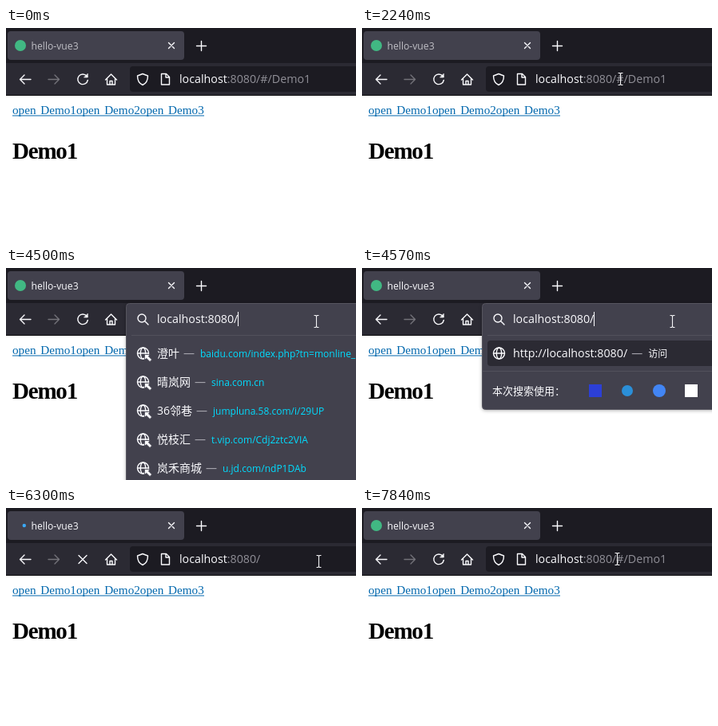
Recreate the animation shown at these times as an HTML page. Size 438 by 266 pixels, loop 8000 ms.

```html
<!DOCTYPE html>
<html lang="zh-CN">
<head>
<meta charset="utf-8">
<title>Browser address bar</title>
<style>
html, body { margin: 0; width: 100%; height: 100%; overflow: hidden; background: #fff; }
svg { display: block; width: 100vw; height: 100vh; }
text { font-family: "Open Sans", "Noto Sans CJK SC", "Noto Sans CJK", sans-serif; fill: #fbfbfe; white-space: pre; }
.line { fill: none; stroke: #fbfbfe; stroke-width: 1.4; stroke-linecap: round; stroke-linejoin: round; }
.url { font-size: 14.25px; }
.row { font-size: 14px; }
.row .dash { fill: #a9a8b0; }
.row .link { fill: #00ddff; font-size: 12px; }
.page text { font-family: "Liberation Serif", serif; }
.page .nav { font-size: 15.2px; word-spacing: 1.9px; fill: #0067ad; }
.page .head { font-size: 29px; font-weight: bold; letter-spacing: -1.2px; fill: #000; }
#panel { filter: drop-shadow(0 1px 2px rgba(0, 0, 0, .3)); }
</style>
</head>
<body>
<svg viewBox="0 0 438 266" preserveAspectRatio="none">
  <defs>
    <clipPath id="tabClip"><rect x="2" y="4" width="221" height="36" rx="4"/></clipPath>
    <g id="globe" class="line">
      <circle r="7"/><ellipse rx="3.2" ry="7"/><path d="M-7 0H7"/>
    </g>
  </defs>

  <rect width="438" height="44" fill="#1c1b22"/>
  <rect y="44" width="438" height="41" fill="#2b2a33"/>
  <rect y="84" width="438" height="1" fill="#0c0c0d"/>

  <g clip-path="url(#tabClip)">
    <rect x="2" y="4" width="221" height="36" fill="#42414d"/>
    <circle id="burst" cx="18" cy="22" fill="#0a84ff"/>
  </g>
  <circle id="favicon" cx="18" cy="22" r="7" fill="#41b883"/>
  <circle id="dot" cy="22" r="2.2"/>
  <text id="title" x="31.5" y="26.5" font-size="12.2"></text>
  <path class="line" stroke-width="1.2" d="M203.500 18.500l7 7m0-7l-7 7"/>
  <path class="line" d="M238.500 22.500h12m-6-6v12"/>

  <path class="line" d="M31 64.500H17.500m5.500-5.500l-5.500 5.500l5.500 5.500"/>
  <path class="line" opacity=".35" d="M53 64.500h13.500m-5.500-5.500l5.500 5.500l-5.500 5.500"/>
  <g id="reload" class="line">
    <path id="arc" pathLength="100" d="M101 60.300A6.300 6.300 0 1 0 102.300 65.500"/>
    <path id="tip" d="M102.300 57.500V62H97.800Z" fill="#fbfbfe" stroke-width=".6"/>
  </g>
  <path id="stop" class="line" d="M91 59.500l10 10m0-10l-10 10"/>
  <path class="line" d="M124.500 65l7-7l7 7M126.500 63.500v7.500h10v-7.500M130 71v-4.500h3V71"/>

  <g class="page">
    <text class="nav" x="8" y="108">open Demo1open Demo2open Demo3</text>
    <rect x="8" y="109.500" width="240" height="1" fill="#0067ad"/>
    <text class="head" x="8" y="163.500">Demo1</text>
  </g>

  <rect id="field" x="155" y="48" width="300" height="32" rx="4"/>
  <g id="panel">
    <rect id="sheet" x="150.500" y="44.500" width="300" rx="4" fill="#42414d" stroke="#56555f"/>
    <rect x="157" y="84" width="290" height="1" fill="#52515c"/>
    <g id="sites"></g>
    <g id="visit">
      <rect x="157" y="91" width="300" height="32" rx="4" fill="#2b2a33"/>
      <use href="#globe" x="171.500" y="107"/>
      <text class="row" x="189" y="112"><tspan class="url">http://localhost:8080/</tspan><tspan class="dash" dx="5">—</tspan><tspan dx="7" font-size="12">访问</tspan></text>
      <rect x="151" y="129" width="300" height="1" fill="#52515c"/>
      <text x="163" y="159" font-size="13">本次搜索使用：</text>
      <rect x="284" y="146" width="16" height="16" fill="#2c3fd6"/>
      <circle cx="332" cy="154" r="7" fill="#2b8fd8"/>
      <circle cx="372" cy="154" r="8" fill="#4285f4"/>
      <rect x="404" y="146" width="16" height="16" fill="#fff"/>
    </g>
  </g>

  <g id="pageIcons" class="line">
    <path d="M171 57.500l6.500 2.500c0 6-2 9.500-6.500 11.500c-4.500-2-6.500-5.500-6.500-11.500Z"/>
    <path d="M194.500 57.500h6l4 4v9.500h-10ZM200 58v4h4"/>
  </g>
  <path id="lens" class="line" d="M174 67l4 4M165 63a5 5 0 1 0 10 0a5 5 0 1 0 -10 0"/>
  <rect id="mark" x="318" y="55" height="18" fill="#2c7486"/>
  <text id="url" class="url" y="69"><tspan id="host"></tspan><tspan id="rest" fill="#919098"></tspan></text>
  <rect id="caret" y="55" width="1" height="18" fill="#fbfbfe"/>

  <path id="arrow" d="M0 0V16L3.700 12.600L6.200 18.300L8.700 17.200L6.200 11.700H11.300Z" fill="#fff" stroke="#000" stroke-width=".9"/>
  <path id="beam" d="M-3 -7.500H-1L0 -6.500L1 -7.500H3M0 -6.500V6.500M-3 7.500H-1L0 6.500L1 7.500H3" fill="none" stroke="#f4f4f6" stroke-width="1.100"/>
</svg>

<script>
const LOOP = 8000, STEP = 200 / 3;
const $ = id => document.getElementById(id);
const show = (id, on) => { $(id).style.display = on ? '' : 'none'; };
const set = (id, attrs) => { for (const k in attrs) $(id).setAttribute(k, attrs[k]); };
const clamp = v => Math.min(1, Math.max(0, v));

const sites = [
  ['澄叶', 'baidu.com/index.php?tn=monline_'],
  ['晴岚网', 'sina.com.cn'],
  ['36邻巷', 'jumpluna.58.com/i/29UP'],
  ['悦枝汇', 't.vip.com/Cdj2ztc2VIA'],
  ['岚禾商城', 'u.jd.com/ndP1DAb']
];
$('sites').innerHTML = sites.map(([name, link], i) => {
  const y = 107 + 36 * i;
  return `<use href="#globe" x="171.500" y="${y}"/>
    <path transform="translate(173.500 ${y + 1.5})" d="M0 0H7L4.800 2.200L9 6.500L6.500 9L2.200 4.800L0 7Z" fill="#fbfbfe" stroke="#42414d" stroke-width=".8"/>
    <text class="row" x="189" y="${y + 5}">${name}<tspan class="dash" dx="5">—</tspan><tspan class="link" dx="7">${link}</tspan></text>`;
}).join('');

// time, x, y of the pointer
const path = [
  [500, 360, 255], [567, 295, 222], [633, 240, 202], [700, 213, 195], [833, 213, 195],
  [1167, 69, 170], [1433, 190, 130], [1700, 327, 78], [1833, 326, 70], [2233, 323, 64],
  [2433, 319, 64], [2567, 345, 65], [2967, 388, 67], [4767, 388, 67], [4833, 389, 67],
  [5167, 389, 67], [5233, 391, 67], [7100, 391, 67], [7300, 376, 66], [7633, 328, 64], [7833, 319, 64]
];
// time, bright part, dim part
const address = [
  [0, 'localhost', ':8080/#/Demo1'], [2290, 'localhost:8080/#/Demo1', ''],
  [4490, 'localhost:8080/', ''], [5560, 'localhost:8080', ''],
  [6160, 'localhost', ':8080/'], [6360, 'localhost', ':8080/#/Demo1']
];
const titles = [[0, 'hello-vue3'], [5625, 'localhost:8080/'], [6160, 'hello-vue3']];
const edges = [318, 327.2, 332.4, 342.8, 350.8, 364, 372.7, 381];

const current = (table, t) => table.filter(r => r[0] <= Math.max(t, 0)).pop();

function pointer(t) {
  const i = path.findIndex(p => p[0] > t);
  if (i < 0) return path[path.length - 1].slice(1);
  if (i === 0) return path[0].slice(1);
  const [t0, x0, y0] = path[i - 1], [t1, x1, y1] = path[i];
  const k = (t - t0) / (t1 - t0);
  return [x0 + (x1 - x0) * k, y0 + (y1 - y0) * k];
}

function draw(now) {
  // the screen refreshes 15 times a second
  const t = (Math.floor((now + 7) / STEP + .5) - .5) * STEP;
  const within = (a, b) => t > a - 10 && t < b - 10;

  // tab
  const loading = within(5633, 6633);
  $('title').textContent = current(titles, t)[1];
  set('title', { opacity: t < 2290 ? .68 : 1 });
  show('favicon', !loading);
  show('dot', loading);
  set('dot', {
    cx: 18 - 6 * Math.cos((t - 5667) / 1050 * 2 * Math.PI),
    fill: t < 6160 ? '#a5a4ac' : '#3aa8f5'
  });
  const p = clamp((t - 6640) / 375), grow = 1 - (1 - p) ** 1.65;
  show('burst', p > 0 && p < 1);
  set('burst', { r: 8 * (1 + 39 * grow), opacity: .4 * (1 - grow) });

  // reload and stop
  const busy = within(5767, 6633), turn = clamp((t - 6600) / 300);
  const back = within(6633, 7233);
  show('stop', busy);
  show('reload', !busy);
  set('reload', { opacity: back ? .4 : 1 });
  set('arc', { 'stroke-dasharray': back && turn < 1 ? `0 ${100 - 100 * turn - 12} 100` : 'none' });
  show('tip', !back || turn === 1);

  // address bar
  const focus = within(2300, 6167), open = within(2367, 5567);
  const fresh = t > 4557, typed = within(4500, 5567);
  set('field', { fill: focus ? '#42414d' : '#1c1b22' });
  show('panel', open);
  show('sites', !fresh);
  show('visit', fresh);
  set('sheet', { height: fresh ? 133 : 240 });
  show('pageIcons', !typed);
  show('lens', typed);
  const [, host, rest] = current(address, t);
  $('host').textContent = host;
  $('rest').textContent = rest;
  set('url', { x: typed ? 189 : 217 });
  show('caret', within(4500, 5033) || within(5567, 6100));
  set('caret', { x: typed ? 290 : 312 });

  // pointer and selection
  const [x, y] = pointer(t);
  const end = edges.reduce((a, b) => Math.abs(b - x) < Math.abs(a - x) ? b : a);
  show('mark', within(2433, 4500));
  set('mark', { width: end - 318 });
  const beam = y < 80;
  show('arrow', t > 490 && !beam);
  show('beam', t > 490 && beam);
  set(beam ? 'beam' : 'arrow', { transform: `translate(${Math.round(x) + (beam ? .5 : 0)} ${Math.round(y)})` });
}

const start = performance.now();
function tick() {
  draw((performance.now() - start) % LOOP);
  requestAnimationFrame(tick);
}
tick();
</script>
</body>
</html>
```
